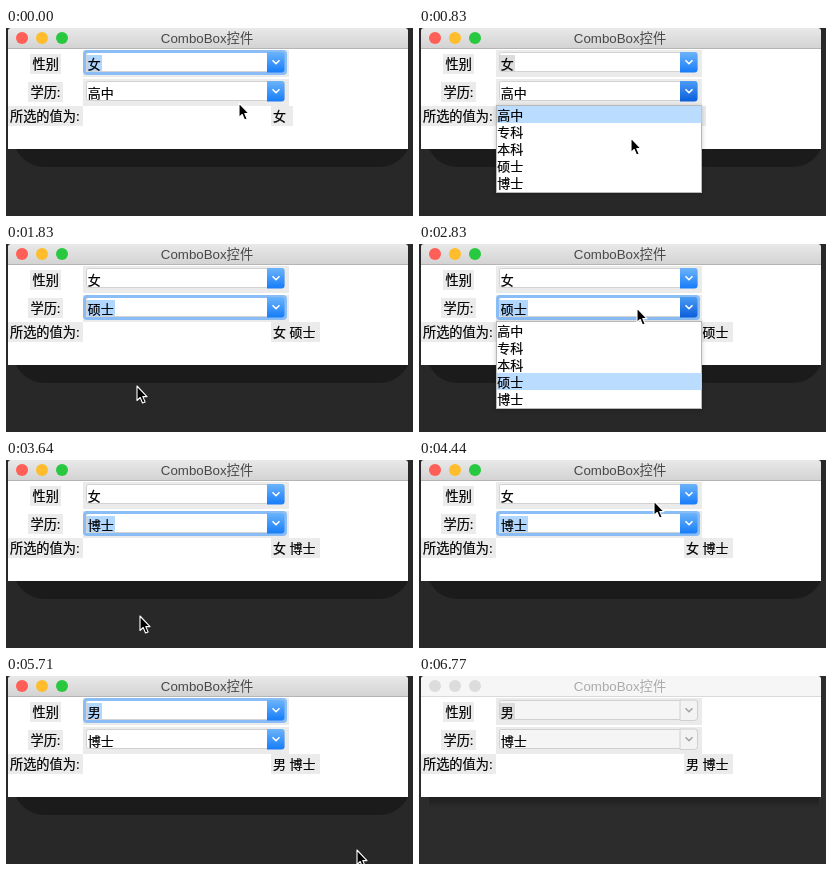
Animation of 407x188 px, one loop 6830 ms. Source, as an HTML page:

```html
<!DOCTYPE html>
<html lang="zh-CN">
<head>
<meta charset="utf-8">
<title>ComboBox</title>
<style>
  html, body { margin: 0; width: 100%; height: 100%; overflow: hidden; background: #282828; }
  svg { display: block; width: 407px; height: 188px; }
  text {
    font: 13px "Liberation Sans", "Noto Sans CJK SC", "Noto Sans CJK", sans-serif;
    white-space: pre; fill: #000; stroke: #000; stroke-width: .2;
  }
  .label { font-size: 13.2px; }
  #title { font-size: 13.3px; fill: #484848; stroke: none; text-anchor: middle; }
  .plate { fill: #ebebeb; }
  .field { fill: #fff; stroke: #d2d2d2; }
  .ring { fill: none; stroke: #8abdf5; stroke-width: 3; }
  .button { fill: url(#blue); }
  .open .button { fill: url(#deep); }
  .chevron { fill: none; stroke: #fff; stroke-width: 1.6; stroke-linecap: round; stroke-linejoin: round; }
  .mark { fill: #b2d7ff; }
  .faded .mark { fill: #dcdcdc; }
  .popup { filter: drop-shadow(0 1px 2px rgba(0, 0, 0, .22)); }
  .popup .sheet { fill: #fff; stroke: #b8b8b8; }
  .popup .hover { fill: #b9dcff; }
  .soft { display: none; }
  .idle .soft { display: inline; }
  .idle .hard { display: none; }
  .idle #bar { fill: #f6f6f6; }
  .idle #edge { fill: #dadada; }
  .idle #title { fill: #ababab; }
  .idle .light { fill: #dcdcdc; }
  .idle .field { fill: #f5f5f5; stroke: #d0d0d0; }
  .idle .button { fill: #f3f3f3; stroke: #d0d0d0; }
  .idle .chevron { stroke: #a4a4a4; }
</style>
</head>
<body>
<svg id="stage" viewBox="0 0 407 188">
  <defs>
    <linearGradient id="barFill" x2="0" y2="1"><stop stop-color="#e9e9e9"/><stop offset="1" stop-color="#d2d2d2"/></linearGradient>
    <linearGradient id="blue" x2="0" y2="1"><stop stop-color="#6cb4fb"/><stop offset="1" stop-color="#167cf8"/></linearGradient>
    <linearGradient id="deep" x2="0" y2="1"><stop stop-color="#4b9cf4"/><stop offset="1" stop-color="#0a5edb"/></linearGradient>
    <linearGradient id="shade" x2="0" y2="1"><stop stop-color="#1e1e1e"/><stop offset="1" stop-color="#2c2c2c"/></linearGradient>
  </defs>
  <path class="hard" fill="#1b1b1b" d="M10 121Q19 138 38 139H374Q393 138 402 121Z"/>
  <g class="soft">
    <rect width="407" height="188" fill="#2c2c2c"/>
    <rect x="10" y="121" width="390" height="11" fill="url(#shade)"/>
  </g>
  <rect x="2" y="21" width="400" height="100" fill="#fff"/>
  <path id="bar" fill="url(#barFill)" d="M2 21V3Q2 0 5 0H399Q402 0 402 3V21Z"/>
  <rect id="edge" x="2" y="20" width="400" height="1" fill="#b5b5b5"/>
  <circle class="light" cx="16" cy="10" r="6" fill="#ff5f57"/>
  <circle class="light" cx="36" cy="10" r="6" fill="#ffbd2e"/>
  <circle class="light" cx="56" cy="10" r="6" fill="#28c940"/>
  <text id="title" x="201" y="15">ComboBox控件</text>
  <g class="plate">
    <rect x="24" y="26" width="31" height="20"/>
    <rect x="22" y="54" width="35" height="20"/>
    <rect x="2" y="78" width="75" height="20"/>
    <rect id="plate" x="265" y="78" width="22" height="20"/>
  </g>
  <text class="label" x="26.5" y="41">性别</text>
  <text class="label" x="24.5" y="69">学历:</text>
  <text class="label" x="4" y="93">所选的值为:</text>
  <text id="value" x="267" y="93"></text>
  <g id="widgets"></g>
  <path id="cursor" fill="#000" stroke="#fff" stroke-width="1.1" stroke-linejoin="round"
        d="M0 0V14.5L3.2 11.5L5.5 17L8.1 15.9L5.8 10.6H10Z"/>
</svg>
<script>
const LOOP = 6830;
const $ = id => document.getElementById(id);
const widgets = $('widgets');

function add(parent, tag, attrs, text = '') {
  const el = document.createElementNS('http://www.w3.org/2000/svg', tag);
  for (const k in attrs) el.setAttribute(k, attrs[k]);
  el.textContent = text;
  return parent.appendChild(el);
}
const box = (parent, cls, x, y, width, height, rx = 0) =>
  add(parent, 'rect', { class: cls, x, y, width, height, rx });
const show = (el, on) => el.style.display = on ? '' : 'none';

function combo(y) {
  const g = add(widgets, 'g', { transform: `translate(0 ${y})` });
  box(g, 'plate', 77, 0, 206, 27);
  box(g, 'field', 80.5, 2.5, 198, 19, 2);
  const ring = box(g, 'ring', 78.5, 1.5, 201, 22, 2.5);
  add(g, 'path', { class: 'button', d: 'M261 2H275.5Q278.5 2 278.5 5V19.5Q278.5 22.5 275.5 22.5H261Z' });
  add(g, 'path', { class: 'chevron', d: 'M267 10.7L270 13.7L273 10.7' });
  const mark = box(g, 'mark', 81, 5, 16, 16);
  const text = add(g, 'text', { x: 81.8, y: 19 });
  // sel: '' plain, 'on' focused selection, 'faded' unfocused selection
  return (value, focus, sel, open) => {
    text.textContent = value;
    show(ring, focus);
    show(mark, sel);
    mark.setAttribute('width', 2 + 13 * value.length);
    g.setAttribute('class', (sel === 'faded' ? 'faded ' : '') + (open ? 'open' : ''));
  };
}

function popup(y, items) {
  const g = add(widgets, 'g', { class: 'popup', transform: `translate(0 ${y})` });
  box(g, 'sheet', 77.5, .5, 205, 17 * items.length + 2);
  const hover = box(g, 'hover', 78, 1, 204.5, 17);
  items.forEach((s, i) => add(g, 'text', { x: 78.3, y: 15 + 17 * i }, s));
  return row => {
    show(g, row >= 0);
    hover.setAttribute('y', 1 + 17 * row);
  };
}

const drawSex = combo(22), drawEdu = combo(51);
const sexList = popup(48, ['男', '女']);
const eduList = popup(77, ['高中', '专科', '本科', '硕士', '博士']);

const both = p => p * p * (3 - 2 * p);
const speedUp = p => p * p;
const slowDown = p => p * (2 - p);

// pointer legs: first step, last step, step count, end x, end y, easing
const legs = [
  [60, 240, 4, 250, 67, both],
  [530, 830, 6, 212, 110, speedUp],
  [890, 1070, 4, 162, 150, slowDown],
  [1130, 1470, 7, 131, 144, both],
  [1710, 1710, 1, 131, 142, both],
  [2130, 2590, 8, 218, 64, both],
  [2890, 3400, 10, 134, 156, both],
  [3810, 4440, 12, 235, 41, both],
  [4680, 5010, 6, 209, 63, both],
  [5370, 5820, 9, 372, 190, both]
];

function pointer(t) {
  let x = 233, y = 75;
  for (const [from, to, n, ex, ey, ease] of legs) {
    if (t < from) break;
    const step = n > 1 ? Math.floor((t - from) / (to - from) * (n - 1) + 1e-6) + 1 : 1;
    const p = ease(Math.min(1, step / n));
    x += (ex - x) * p;
    y += (ey - y) * p;
  }
  return [x, y];
}

// value of the last [time, value] pair already reached
const at = (t, ...pairs) => pairs.reduce((v, [time, next]) => t >= time ? next : v, pairs[0][1]);

function draw(t) {
  const idle = t >= 6770;
  const eduRow = at(t, [0, -1], [420, 0], [890, 1], [950, 2], [1010, 3], [1710, -1],
    [2830, 3], [3110, 1], [3170, 2], [3230, 3], [3290, 4], [3520, -1]);
  const sexRow = at(t, [0, -1], [4560, 1], [4860, 0], [5130, -1]);
  const sex = at(t, [0, '女'], [5130, '男']);
  const edu = at(t, [0, '高中'], [1710, '硕士'], [3520, '博士']);
  const focus = at(t, [0, 'sex'], [420, ''], [1710, 'edu'], [4560, ''], [5130, 'sex'], [6770, '']);
  const sexSel = at(t, [0, 'on'], [420, 'faded'], [1710, ''], [5130, 'on'], [6770, 'faded']);

  drawSex(sex, focus === 'sex', sexSel, sexRow >= 0);
  drawEdu(edu, focus === 'edu', focus === 'edu' ? 'on' : '', eduRow >= 0);
  sexList(sexRow);
  eduList(eduRow);

  $('value').textContent = at(t, [0, '女 '], [1830, '女 硕士'], [3640, '女 博士'], [5130, '男 博士']);
  $('plate').setAttribute('width', t < 1830 ? 22 : 49);
  $('stage').setAttribute('class', idle ? 'idle' : '');

  const [x, y] = pointer(t);
  $('cursor').setAttribute('transform', `translate(${Math.round(x)} ${Math.round(y)})`);
}

const start = performance.now();
function tick() {
  draw((performance.now() - start) % LOOP);
  requestAnimationFrame(tick);
}
tick();
</script>
</body>
</html>
```
